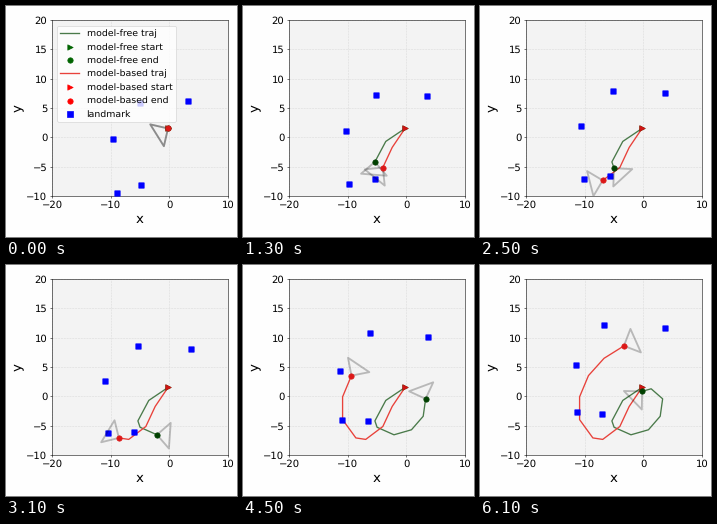
A matplotlib script for the animation above (6300 ms loop, 231 by 231 pixels).

```python
import numpy as np
import matplotlib.pyplot as plt
from matplotlib.animation import FuncAnimation

plt.rcParams.update({"font.family": "DejaVu Sans", "text.hinting": "none"})

SIZE, DPI = 231, 48
FRAMES, INTERVAL, STEP_MS, STEPS = 63, 100, 630, 10
CONE = 3.1
START = (-0.23, 1.51)
GREEN, RED = "#4a7a4a", "#e8413a"


def along(keys, t):
    return np.interp(t, *np.transpose(keys))


def drive(heading_keys, speed_keys):
    """Integrate a steered walk; returns positions and headings per step."""
    k = np.arange(STEPS - 1)
    course = np.radians(along(heading_keys, k + 0.5))
    moves = along(speed_keys, k) * np.array([np.cos(course), np.sin(course)])
    path = np.vstack([START, START + np.cumsum(moves.T, axis=0)])
    return path, along(heading_keys, np.arange(STEPS))


# (step, degrees) and (step, units per step)
free, free_heading = drive(
    [(0, 212), (0.5, 214), (1.5, 242), (3.5, 336), (4.5, 376), (6.5, 442), (9, 584)],
    [(1, 3.95), (2, 1.15), (3, 3.15), (6, 3.0), (7, 2.6), (8, 1.6)])
based, based_heading = drive(
    [(0, 212), (0.5, 236), (1.5, 245), (2.5, 217), (4.5, 126), (5.5, 90), (7, 56), (9, 24)],
    [(0, 3.9), (2, 3.65), (3, 1.7), (4, 3.85), (8, 4.0)])

# landmarks drift from first to last position through a middle one
drift_steps = (0, 4, STEPS - 1)
drifts = [[(-9.6, -0.25), (-11.0, 2.55), (-11.4, 5.4)],
          [(-4.8, -8.2), (-5.95, -6.0), (-7.0, -3.0)],
          [(-9.0, -9.55), (-10.4, -6.3), (-11.35, -2.6)],
          [(3.2, 6.2), (3.75, 8.0), (3.75, 11.6)],
          [(-5.0, 5.85), (-5.3, 8.65), (-6.65, 12.1)]]

fig = plt.figure(figsize=(SIZE / DPI, SIZE / DPI), dpi=DPI, facecolor="#fefefe")
ax = fig.add_axes([46 / SIZE, 41 / SIZE, 176 / SIZE, 176 / SIZE],
                  facecolor="#f3f3f3")
ax.set(xlim=(-20, 10), ylim=(-10, 20),
       xticks=range(-20, 11, 10), yticks=range(-10, 21, 5))
ax.set_xlabel("x", fontsize=20)
ax.set_ylabel("y", fontsize=20)
ax.tick_params(labelsize=15)
ax.grid(color="#dadada", linestyle="--", linewidth=0.8)
ax.set_axisbelow(True)


def dots(marker, color, z=1, pos=(np.nan, np.nan), label=None):
    return ax.scatter(*pos, s=65, c=color, marker=marker, zorder=z,
                      label=label, snap=False)


def line(color, z=1, width=2, **kw):
    return ax.plot([], [], color=color, lw=width, zorder=z, **kw)[0]


# legend entries
for name, path_color, color in (("model-free", GREEN, "darkgreen"),
                                ("model-based", RED, "red")):
    line(path_color, label=f"{name} traj")
    dots(">", color, label=f"{name} start")
    dots("o", color, label=f"{name} end")
dots("s", "blue", label="landmark")
legend = ax.legend(loc="upper left", bbox_to_anchor=(0, 0.995),
                   fontsize=14, framealpha=0.8)

# scene
free_line, based_line = line(GREEN, 3), line(RED, 3)
cones = [line("black", 4, 2.8, alpha=0.24) for _ in range(2)]
dots(">", "#004800", 4, START)
dots(">", "#d01414", 4, START)
marks = dots("s", "blue", 3.5)
free_end, based_end = dots("o", "#004000", 4.5), dots("o", "#dc1818", 4.6)


def cone_points(pos, heading):
    angles = np.radians([heading - 45, heading + 45])
    tips = pos + CONE * np.column_stack([np.cos(angles), np.sin(angles)])
    return np.vstack([pos, tips, pos]).T


def update(i):
    k = i * INTERVAL // STEP_MS
    legend.set_visible(k == 0)
    agents = ((free, free_heading, free_line, free_end),
              (based, based_heading, based_line, based_end))
    for (path, heading, trail, end), cone in zip(agents, cones):
        trail.set_data(*path[:k + 1].T)
        cone.set_data(*cone_points(path[k], heading[k]))
        end.set_offsets(path[k])
    marks.set_offsets([[np.interp(k, drift_steps, axis) for axis in zip(*d)]
                       for d in drifts])
    return []


anim = FuncAnimation(fig, update, frames=FRAMES, interval=INTERVAL,
                     repeat=True, repeat_delay=0)
plt.show()
```
